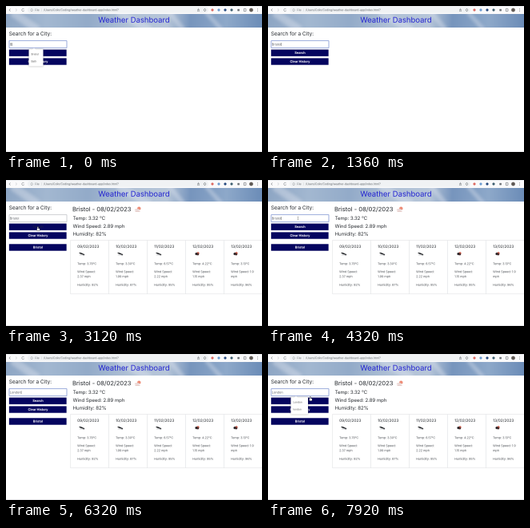
Recreate the animation shown at these times as an HTML page with a canvas. Size 320 by 183 pixels, loop 8 s.

```html
<!DOCTYPE html>
<html lang="en">
<head>
<meta charset="utf-8">
<title>Weather Dashboard</title>
<style>
html, body { margin: 0; width: 100%; height: 100%; overflow: hidden; background: #fff; }
canvas { display: block; width: 320px; height: 183px; }
</style>
</head>
<body>
<canvas id="stage"></canvas>
<script>
const W = 320, H = 183, LOOP = 8000, DETAIL = 4;
const ratio = window.devicePixelRatio || 1;

// The scene is drawn large and scaled down, so small text stays unhinted.
function surface(canvas, scale) {
  canvas.width = W * scale;
  canvas.height = H * scale;
  const ctx = canvas.getContext('2d');
  ctx.scale(scale, scale);
  return ctx;
}

const view = surface(document.getElementById('stage'), ratio);
view.imageSmoothingQuality = 'high';
const backdrop = surface(document.createElement('canvas'), DETAIL);
const scene = surface(document.createElement('canvas'), DETAIL);
let c = backdrop;

const NAVY = '#05055f', INK = '#25292e', SOFT = '#505459';
const forecast = [
  ['09', '3.78', '2.37 mph', 92],
  ['10', '3.30', '1.99 mph', 87],
  ['11', '6.57', '2.22 mph', 95],
  ['12', '4.22', '1.15 mph', 95],
  ['13', '3.13', 'mph', 96]
];

function rect(x, y, w, h, color) {
  c.fillStyle = color;
  c.fillRect(x, y, w, h);
}

function box(x, y, w, h, r, fill, stroke, width = 1) {
  c.beginPath();
  c.roundRect(x, y, w, h, r);
  if (fill) { c.fillStyle = fill; c.fill(); }
  if (stroke) { c.strokeStyle = stroke; c.lineWidth = width; c.stroke(); }
}

function text(s, x, y, size, color = INK, weight = 400, align = 'left') {
  c.font = `${weight} ${size}px Inter, "Liberation Sans", sans-serif`;
  c.textAlign = align;
  c.fillStyle = color;
  c.fillText(s, x, y);
  return c.measureText(s).width;
}

function oval(x, y, rx, ry, color, turn = 0) {
  c.beginPath();
  c.ellipse(x, y, rx, ry, turn, 0, 7);
  c.fillStyle = color;
  c.fill();
}

const dot = (x, y, r, color) => oval(x, y, r, r, color);

function path(points, color, width = 0.5) {
  c.beginPath();
  points.forEach(([x, y], i) => i ? c.lineTo(x, y) : c.moveTo(x, y));
  c.strokeStyle = color;
  c.lineWidth = width;
  c.stroke();
}

function browser() {
  rect(0, 0, W, 10, '#fafafb');
  rect(0, 0, W, 0.6, '#dfe1e5');
  box(27, 1.2, 226, 7.4, 3.7, '#f0f2f4');
  path([[5.5, 3.4], [4, 5], [5.5, 6.6]], '#74797e');
  path([[12, 3.4], [13.5, 5], [12, 6.6]], '#c3c6c9');
  c.beginPath();
  c.arc(21.3, 5, 1.5, 0.4, 5.6);
  c.strokeStyle = '#74797e';
  c.stroke();
  box(31, 3.7, 2.2, 2.8, 1.1, null, '#74797e', 0.4);
  text('File', 36, 6.2, 3.4, '#6b7075');
  rect(44.4, 3.2, 0.3, 3.6, '#c3c6c9');
  text('/Users/Colin/Coding/weather-dashboard-app/index.html?', 47, 6.2, 3.45, '#5f6469');
  path([[240.5, 2.8], [240.5, 5.6]], '#74797e');
  box(239.3, 4.4, 2.4, 2.4, 0.3, null, '#74797e', 0.4);
  path([[248.5, 3.2], [250, 5], [248.5, 6.8], [247, 5], [248.5, 3.2]], '#74797e');
  [[258, '#dc6a62'], [266, '#6b9bd0'], [274, '#24487e'], [282, '#3e5f70']]
    .forEach(([x, color]) => dot(x, 5, 1.6, color));
  box(289.3, 3.8, 2.6, 2.6, 0.5, '#6d7277');
  box(297.2, 3.6, 2.8, 2.8, 0.4, null, '#62676c', 0.6);
  dot(306.5, 5, 2.4, '#615b56');
  for (const y of [3.4, 5, 6.6]) dot(314.5, y, 0.4, '#62676c');
}

function sky() {
  c.save();
  c.beginPath();
  c.rect(0, 10, W, 17);
  c.clip();
  const g = c.createLinearGradient(0, 10, W, 27);
  [[0, '#8ea6c4'], [0.16, '#a3b8d1'], [0.32, '#93abc9'], [0.48, '#b0c1d6'],
    [0.63, '#b7c6d9'], [0.72, '#7795bd'], [0.86, '#8ea9ca'], [1, '#6b8cb7']]
    .forEach(([p, color]) => g.addColorStop(p, color));
  rect(0, 10, W, 17, g);
  c.filter = `blur(${2 * DETAIL}px)`;
  [[8, 40, 10], [140, 180, 10], [204, 222, 6], [250, 270, 5]].forEach(([a, b, w]) =>
    path([[a, 8], [b, 30]], 'rgba(224,231,240,.4)', w));
  c.restore();
  text('Weather Dashboard', 160, 20.7, 9.5, '#2424d2', 400, 'center');
}

function button(label, y, hover) {
  box(3.5, y, 72.5, 9, 0.7, '#b6b6cd');
  box(4, y + 0.4, 71.5, 8.2, 0.4, NAVY);
  text(label, 40, y + 5.8, 3.9, hover ? '#16194b' : '#fff', 700, 'center');
}

function field(value, focus, caret) {
  box(4, 43.5, 72, 9, 0.5, '#fff', focus ? '#8296d2' : '#c2c4c8', 0.8);
  const width = text(value, 4.8, 49.4, 3.9, '#5b5f64');
  if (caret) rect(5 + width, 46, 0.4, 4.2, '#444');
}

function suggestions(items, width) {
  c.save();
  c.shadowColor = 'rgba(0,0,0,.4)';
  c.shadowBlur = 2 * DETAIL;
  box(28.5, 54.3, width, 21.2, 1, '#fff');
  c.restore();
  c.beginPath();
  c.moveTo(33, 54.6);
  c.lineTo(35, 52.5);
  c.lineTo(37, 54.6);
  c.fillStyle = '#fff';
  c.fill();
  items.forEach((s, i) => text(s, 31.5, 61.6 + i * 9, 3.2, '#5a5a5a'));
}

function cloud(x, y) {
  oval(x + 0.3, y + 1.2, 3.6, 1, '#dcdddf');
  oval(x - 0.6, y - 0.4, 3, 0.8, '#222427', 0.35);
  dot(x + 2.4, y + 0.9, 0.9, '#35373a');
}

function rain(x, y) {
  dot(x + 1.2, y - 0.8, 1.6, '#cf5d4a');
  dot(x - 0.8, y, 1.6, '#29262a');
  dot(x + 1, y + 0.5, 1.4, '#4a2b2b');
}

function results() {
  text('Bristol - 08/02/2023', 83, 39.3, 7.6);
  dot(166.3, 35.7, 2.2, '#ee8a74');
  oval(164, 37.5, 3.2, 1.4, '#ead7d5');
  path([[161.5, 39.3], [167.5, 39.3]], '#c99792');
  text('Temp: 3.32 °C', 83.6, 50.1, 6);
  text('Wind Speed: 2.89 mph', 83.6, 59.9, 6);
  text('Humidity: 82%', 83.6, 69.7, 6);

  forecast.forEach(([day, temp, wind, humidity], i) => {
    const x = 80.5 + i * 48, tx = x + 8.6;
    box(x, 75.5, 48, 67.3, 0.6, '#fff', '#e6e7e9', 0.7);
    text(`${day}/02/2023`, tx, 85.1, 4.8);
    (i < 3 ? cloud : rain)(x + 14.3, 92.6);
    text(`Temp: ${temp}°C`, tx, 106.3, 3.75, SOFT);
    text(i < 4 ? 'Wind Speed:' : 'Wind Speed: 1.9', tx, 116.2, 3.75, SOFT);
    text(wind, tx, 122.2, 3.75, SOFT);
    text(`Humidity: ${humidity}%`, tx, 132.7, 3.75, SOFT);
  });
}

function glide(t, start, end, from, to) {
  let p = Math.min(1, Math.max(0, (t - start) / (end - start)));
  p = p * p * (3 - 2 * p);
  return from.map((v, i) => v + (to[i] - v) * p);
}

function pointer(t) {
  if (t >= 1500 && t < 3600) return glide(t, 1500, 1960, [56, 50], [40, 61]);
  if (t >= 3600 && t < 4560) return glide(t, 3600, 4000, [40, 61], [37.5, 48]);
  if (t >= 6880) return glide(t, 6880, 7440, [39, 48], [53, 56]);
  return null;
}

function drawPointer([x, y], beam) {
  if (beam) {
    path([[x, y - 2], [x, y + 2]], '#555', 0.4);
    for (const end of [y - 2, y + 2]) path([[x - 0.7, end], [x + 0.7, end]], '#555', 0.3);
    return;
  }
  box(x - 0.8, y - 2.5, 1.3, 4, 0.6, '#fff', '#222', 0.4);
  box(x - 1.4, y - 0.3, 3.6, 3, 0.9, '#fff', '#222', 0.4);
  rect(x - 0.5, y - 1.5, 0.7, 2.2, '#fff');
}

function typed(t) {
  const count = (start, step) => Math.max(0, Math.floor((t - start) / step));
  if (t < 4600) return 'Bristol'.slice(0, 1 + count(160, 110));
  if (t < 5280) return 'Bristol'.slice(0, Math.max(0, 7 - count(4600, 80)));
  return 'London'.slice(0, count(5280, 130));
}

function draw(t) {
  c.drawImage(backdrop.canvas, 0, 0, W, H);
  const pos = pointer(t);
  const inField = pos && pos[1] < 53;
  const hover = pos && pos[1] >= 54;
  const focus = t < 2160 || t >= 4080;
  field(typed(t), focus, focus && t % 1000 < 500);
  button('Search', 54.3, hover);
  button('Clear History', 65.1);
  if (t >= 2160) button('Bristol', 80);
  if (t >= 2560) results();
  if (t < 880) suggestions(['Bristol', 'Bath'], 18);
  if (t >= 7280) suggestions(['London', 'london'], 21.5);
  if (pos) drawPointer(pos, inField);
  view.drawImage(scene.canvas, 0, 0, W, H);
}

rect(0, 0, W, H, '#fff');
browser();
sky();
text('Search for a City:', 3.7, 36.9, 6.5);
rect(0, 182.4, W, 0.6, '#d9dadd');
c = scene;

const begin = performance.now();
function tick() {
  draw((performance.now() - begin) % LOOP);
  requestAnimationFrame(tick);
}
tick();
</script>
</body>
</html>
```
